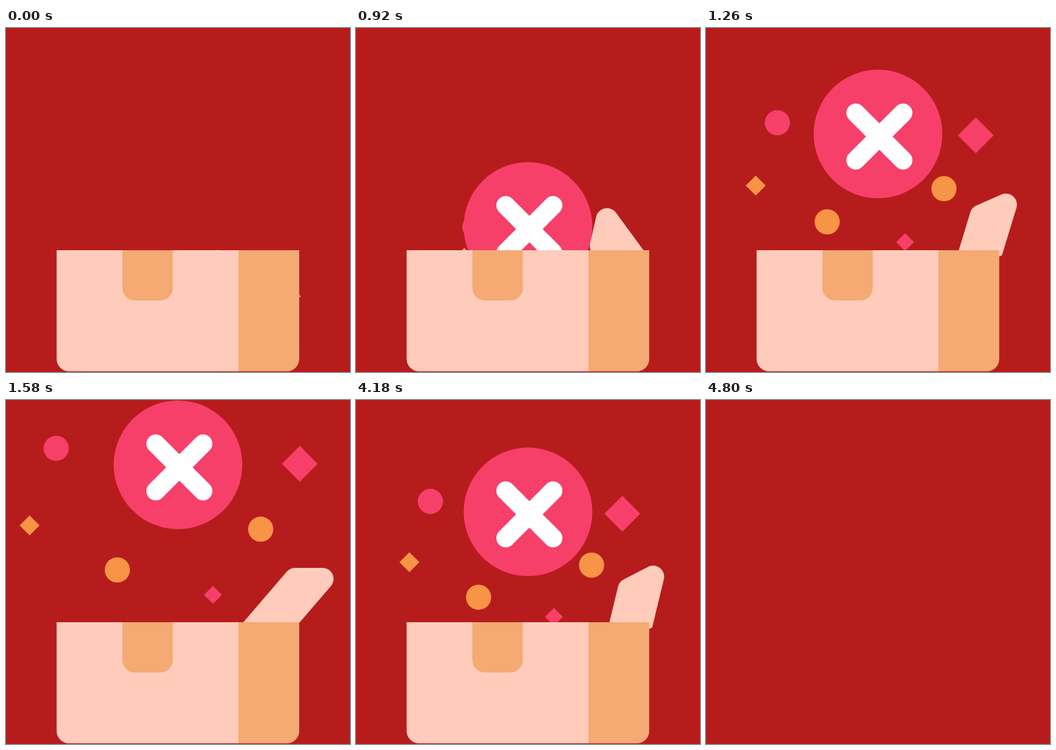
These frames come from a looping animation (500x500 px, 4.82 s). An HTML page with a canvas:

```html
<!DOCTYPE html>
<html lang="en">
<head>
<meta charset="utf-8">
<title>Box opening on an error badge</title>
<style>
  html, body { margin: 0; width: 100%; height: 100%; overflow: hidden; background: #b71c1c; }
  canvas { display: block; width: 100vw; height: 100vh; }
</style>
</head>
<body>
<canvas id="stage" width="500" height="500"></canvas>
<script>
const ctx = document.getElementById('stage').getContext('2d');

const LOOP = 4820;
const OPEN = { start: 420, length: 1160 };
const CLOSE = { start: 3920, length: 880 };
const BLANK_FROM = 4800;

const RED = '#b71c1c', PEACH = '#ffccbc', TAN = '#f4aa72';
const PINK = '#f64069', ORANGE = '#f89446', WHITE = '#fff';

const BOX = { left: 73.6, right: 426.2, top: 323, bottom: 499, fold: 337.8, radius: 18 };
const SOURCE = { x: 239, y: 434.5 };
const CONFETTI = [
  { draw: disc, x: 73, y: 70.2, size: 18.3, color: PINK },
  { draw: disc, x: 161.8, y: 247, size: 18.3, color: ORANGE },
  { draw: disc, x: 370.2, y: 187.8, size: 18.3, color: ORANGE },
  { draw: diamond, x: 427, y: 92.8, size: 26, color: PINK },
  { draw: diamond, x: 300.8, y: 283.2, size: 13, color: PINK },
  { draw: diamond, x: 34.3, y: 182.3, size: 14.5, color: ORANGE }
];

const mix = (a, b, k) => a + (b - a) * k;

function ease(t, { start, length }) {
  const k = Math.min(1, Math.max(0, (t - start) / length));
  return k * k * (3 - 2 * k);
}

function disc(x, y, size) {
  ctx.beginPath();
  ctx.arc(x, y, size, 0, 2 * Math.PI);
  ctx.fill();
}

function diamond(x, y, size) {
  ctx.beginPath();
  ctx.moveTo(x, y - size);
  ctx.lineTo(x + size, y);
  ctx.lineTo(x, y + size);
  ctx.lineTo(x - size, y);
  ctx.fill();
}

function panel(left, right, top, bottom, corners, color) {
  ctx.fillStyle = color;
  ctx.beginPath();
  ctx.roundRect(left, top, right - left, bottom - top, corners);
  ctx.fill();
}

function badge(hidden) {
  const y = 94.2 + 323 * hidden;
  ctx.fillStyle = PINK;
  disc(250, y, 93.5);

  const cx = 252, cy = y + 3.7, arm = 34.4;
  ctx.strokeStyle = WHITE;
  ctx.lineWidth = 27.2;
  ctx.lineCap = 'round';
  ctx.beginPath();
  for (const side of [-1, 1]) {
    ctx.moveTo(cx - arm * side, cy - arm);
    ctx.lineTo(cx + arm * side, cy + arm);
  }
  ctx.stroke();
}

// The flap turns about its own middle while that middle slides into the box.
function flap(hidden) {
  const middle = { x: 410.5, y: 284 };
  ctx.save();
  ctx.translate(middle.x - 55.7 * hidden, middle.y + 79 * hidden);
  ctx.rotate(-128 * hidden * Math.PI / 180);
  ctx.translate(-middle.x, -middle.y);
  ctx.fillStyle = PEACH;
  ctx.beginPath();
  ctx.moveTo(343.3, 325);
  ctx.arcTo(412.9, 244, 450, 244, 16);
  ctx.arcTo(494.9, 244, 425.3, 325, 16);
  ctx.lineTo(425.3, 325);
  ctx.fill();
  ctx.restore();
}

function box() {
  const { left, right, top, bottom, fold, radius } = BOX;
  panel(left, fold + 1, top, bottom, [0, 0, 0, radius], PEACH);
  panel(fold, right, top, bottom, [0, 0, radius, 0], TAN);
  panel(169.2, 242.4, top, 396, [0, 0, radius, radius], TAN);
}

function render(t) {
  ctx.fillStyle = RED;
  ctx.fillRect(0, 0, 500, 500);
  if (t >= BLANK_FROM) return;

  const hidden = 1 - ease(t, OPEN) + ease(t, CLOSE);

  ctx.save();
  ctx.beginPath();
  ctx.rect(0, 0, 500, BOX.bottom);
  ctx.clip();
  for (const { draw, x, y, size, color } of CONFETTI) {
    ctx.fillStyle = color;
    draw(mix(x, SOURCE.x, hidden), mix(y, SOURCE.y, hidden), size);
  }
  badge(hidden);
  flap(hidden);
  box();
  ctx.restore();
}

const began = performance.now();
function tick() {
  render((performance.now() - began) % LOOP);
  requestAnimationFrame(tick);
}
tick();
</script>
</body>
</html>
```
